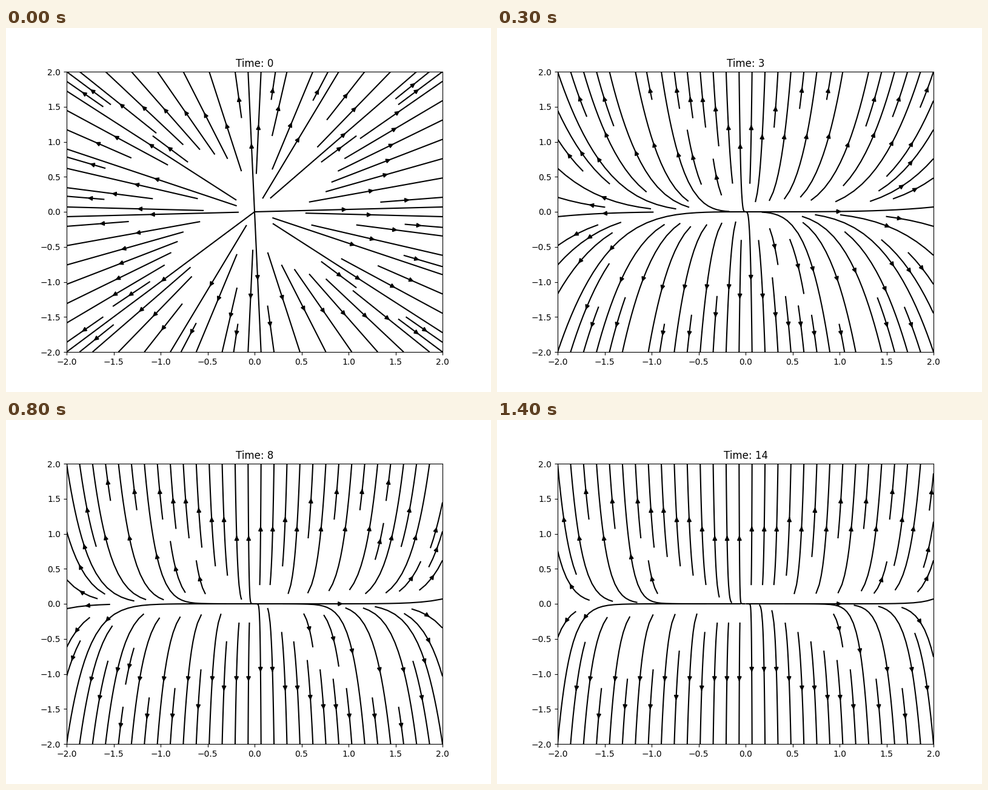
Animation of 800 by 600 pixels, one loop 1500 ms. Source, as a matplotlib script:

```python
import numpy as np
import matplotlib.pyplot as plt
from matplotlib.animation import FuncAnimation

FRAMES = 15
LIMIT = 2

fig, ax = plt.subplots(figsize=(8, 6), dpi=100)
axis = np.linspace(-LIMIT, LIMIT, 20)
X, Y = np.meshgrid(axis, axis)


def draw(t):
    """Outward flow whose vertical part grows with time."""
    ax.clear()
    ax.streamplot(X, Y, X, (1 + t) * Y, color="black")
    ax.set_xlim(-LIMIT, LIMIT)
    ax.set_ylim(-LIMIT, LIMIT)
    ax.set_title(f"Time: {t}")


anim = FuncAnimation(fig, draw, frames=FRAMES, interval=100, repeat=True)
plt.show()
```
